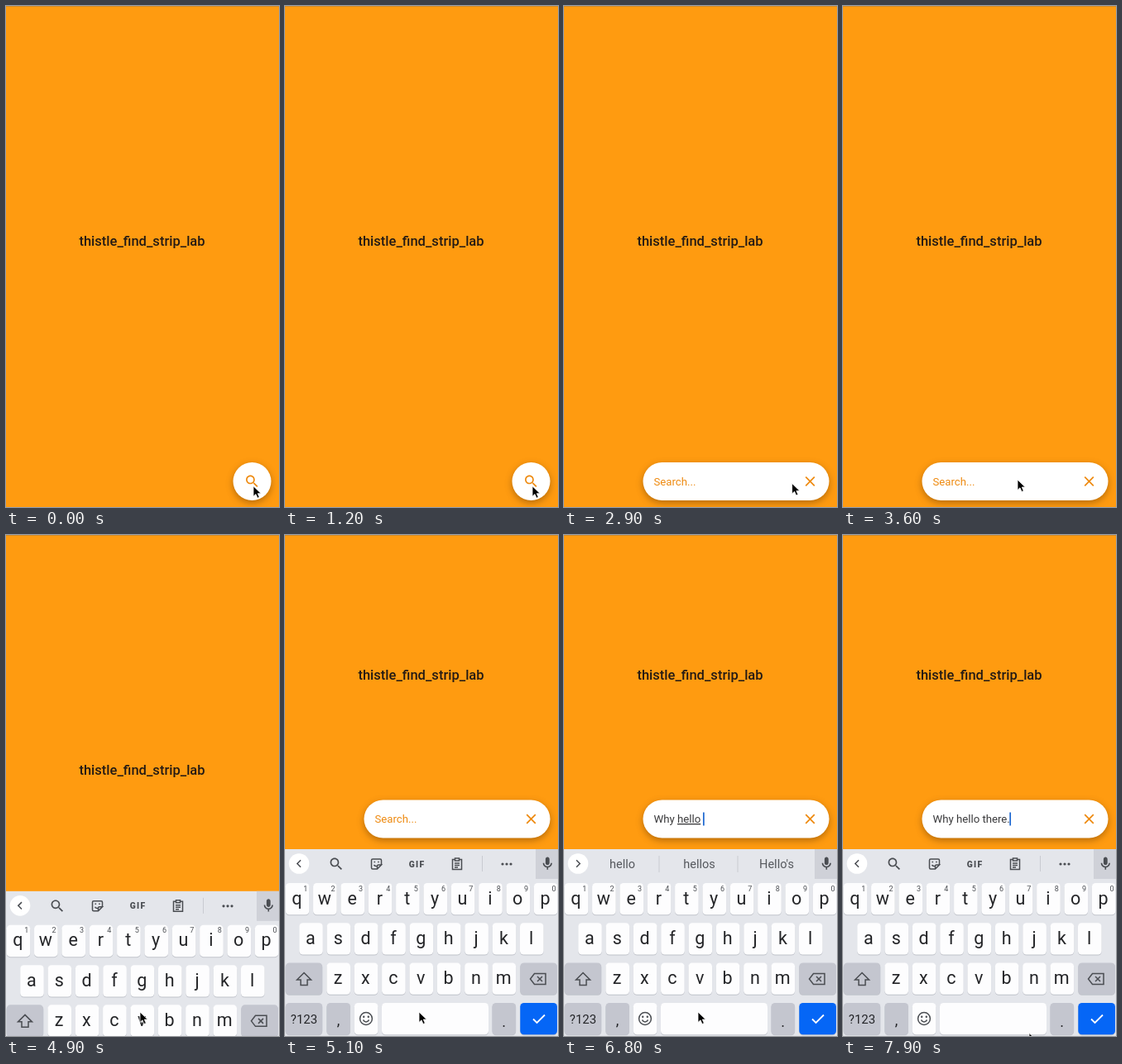
Recreate the animation shown at these times as an HTML page. Size 330 by 606 pixels, loop 8 s.

```html
<!DOCTYPE html>
<html lang="en">
<head>
<meta charset="utf-8">
<title>Search button</title>
<style>
html, body { margin: 0; width: 100%; height: 100%; overflow: hidden; background: #ff9b10; }
svg { display: block; width: 330px; height: 606px; font-family: Roboto, sans-serif; }
text { white-space: pre; }
.mid { text-anchor: middle; }
.line { fill: none; stroke: #4a4d52; stroke-width: 1.5; }
#bar { filter: drop-shadow(0 3px 4px rgba(60, 30, 0, .38)); }
</style>
</head>
<body>
<svg viewBox="0 0 330 606">
  <defs><clipPath id="pill"><rect class="pill" y="552" height="46" rx="23"/></clipPath></defs>
  <rect width="330" height="606" fill="#ff9b10"/>
  <rect width="330" height="1" fill="#cf8a2c"/>
  <text id="title" class="mid" x="164.5" y="290" font-size="16.5" font-weight="500" fill="#241a14">thistle_find_strip_lab</text>
  <g id="field">
    <rect id="bar" class="pill" y="552" height="46" rx="23" fill="#fff"/>
    <rect id="press" x="275" y="552" width="46" height="46" fill="#eeeff0" clip-path="url(#pill)"/>
    <text id="hint" x="108.5" y="579.5" font-size="13.2" fill="#ee8a10">Search...</text>
    <text id="typed" x="108.5" y="579.5" font-size="13.2" fill="#3a3a3c"><tspan></tspan><tspan text-decoration="underline"></tspan><tspan></tspan></text>
    <rect id="caret" y="567" width="1.7" height="16" fill="#1a66d0"/>
    <g id="lens"></g>
    <path id="cross" d="M292.2 569.6l10.6 10.8m0-10.8l-10.6 10.8" fill="none" stroke="#ee8a10" stroke-width="1.7"/>
  </g>
  <g id="keyboard"></g>
  <path id="mouse" d="M0 0V12.5L3 9.8L5 14.5L7.3 13.5L5.3 9H9.3Z" fill="#000" stroke="#fff" stroke-width=".8"/>
</svg>
<script>
const $ = id => document.getElementById(id);
const clamp = x => Math.min(1, Math.max(0, x));
const span = (t, a, b) => clamp((t - a) / (b - a));
const smooth = x => x * x * (3 - 2 * x);
const show = (id, opacity) => $(id).setAttribute('opacity', +opacity);
const move = (id, x, y) => $(id).setAttribute('transform', `translate(${x} ${y})`);

const LENS = 'M15.5 14h-.79l-.28-.27C15.41 12.59 16 11.11 16 9.5 16 5.91 13.09 3 9.5 3S3 5.91 3 9.5 5.91 16 9.5 16c1.61 0 3.09-.59 4.23-1.57l.27.28v.79l5 4.99L20.49 19zM9.5 14C7.01 14 5 11.99 5 9.5S7.01 5 9.5 5 14 7.01 14 9.5 11.99 14 9.5 14z';
const MIC = 'M12 14c1.66 0 3-1.34 3-3V5c0-1.66-1.34-3-3-3S9 3.34 9 5v6c0 1.66 1.34 3 3 3zm5-3c0 2.76-2.24 5-5 5s-5-2.24-5-5H5c0 3.53 2.61 6.43 6 6.92V21h2v-3.08c3.39-.49 6-3.39 6-6.92z';

const glyph = (d, x, y, fill, size = .825) =>
  `<path d="${d}" fill="${fill}" transform="translate(${x} ${y}) scale(${size}) translate(-12 -12)"/>`;
const line = (d, x, y, extra = '') => `<path class="line" d="${d}" transform="translate(${x} ${y})" ${extra}/>`;
const label = (s, x, y, size, fill = '#242528', extra = '') =>
  `<text class="mid" x="${x}" y="${y}" font-size="${size}" fill="${fill}" ${extra}>${s}</text>`;
const key = (x, y, w, fill = '#fdfdfe') =>
  `<rect x="${x}" y="${y + 1}" width="${w}" height="38.3" rx="4.5" fill="#c0c3ca"/>` +
  `<rect x="${x}" y="${y}" width="${w}" height="38.3" rx="4.5" fill="${fill}"/>`;

function keyboardMarkup() {
  const dark = '#c4c6cf', ink = '#4a4d52', step = 33.35;
  let s = '<rect y="380" width="330" height="226" fill="#e4e6eb"/>' +
    '<rect x="303" y="380" width="27" height="36" fill="#cfd1d8"/>' + glyph(MIC, 317.3, 397.5, ink, .8) +
    '<circle cx="17" cy="397.5" r="12.3" fill="#fff"/>' +
    line('M2 -4.2L-2.2 0L2 4.2', 17, 397.5, 'id="chevron"');

  s += '<g id="tools">' + glyph(LENS, 62, 398, ink) +
    line('M6 1V-4.5Q6 -6 4.5 -6H-4.5Q-6 -6 -6 -4.5V4.5Q-6 6 -4.5 6H1L6 1H2.5Q1 1 1 2.5V6M-3 -2.5h1.6M1.6 -2.5h1.6M-3 1Q-1.5 3 .5 2.5', 110.5, 398) +
    label('GIF', 159.5, 401.5, 10.3, ink, 'font-weight="900" letter-spacing="1.3"') +
    line('M-2.5 -5.5H-5.5V6.5H5.5V-5.5H2.5M-2.5 -7H2.5V-4H-2.5ZM-3 -1H3M-3 1.5H3M-3 4H1', 208, 398) +
    '<path d="M238.5 388v19" stroke="#c9cbd1"/>' +
    [263, 268, 273].map(x => `<circle cx="${x}" cy="398" r="1.6" fill="${ink}"/>`).join('') + '</g>';

  s += '<g id="words"><path d="M115 388v20M210 388v20" stroke="#c9cbd1"/>' +
    [70.5, 163.5, 257].map(x => label('', x, 403, 14.5, '#55585d')).join('') + '</g>';

  [['qwertyuiop', 15, 421], ['asdfghjkl', 31.5, 469.3], ['zxcvbnm', 64.7, 517.5]].forEach(([row, x0, y], r) => {
    [...row].forEach((c, i) => {
      const x = x0 + i * step;
      s += key(x - 14.3, y, 28.6) + label(c, x - .6, y + 25.5, 21.5);
      if (!r) s += label((i + 1) % 10, x + 9.8, y + 9.5, 9, ink);
    });
  });

  s += key(.7, 517.5, 44.5, dark) + line('M0 -7.5L8.5 1H4V7.5H-4V1H-8.5Z', 23, 537) +
    key(284.3, 517.5, 44.7, dark) + line('M-4 -6.5H9.5V6.5H-4L-9 0ZM-.5 -3L5.5 3M5.5 -3L-.5 3', 305.5, 537) +
    key(.7, 566, 44.5, dark) + label('?123', 23, 590.5, 15) +
    key(50.4, 566, 28.6, dark) + label(',', 64.5, 593, 18) +
    key(83.8, 566, 28.6) + '<circle class="line" cx="98" cy="585" r="7.4"/>' +
    line('M-3.6 1.5Q0 6.6 3.6 1.5', 98, 585) +
    `<g fill="${ink}"><circle cx="95.2" cy="582.7" r="1.2"/><circle cx="100.8" cy="582.7" r="1.2"/></g>` +
    key(117, 566, 129) + key(250.5, 566, 28.6, dark) + label('.', 264.7, 595, 18) +
    key(284.3, 566, 44.7, '#0566f6') + line('M-7 .5L-2.5 5L7 -4.5', 307, 585, 'style="stroke:#fff;stroke-width:1.8"');
  return s;
}

$('keyboard').innerHTML = keyboardMarkup();
$('lens').innerHTML = glyph(LENS, 297.5, 575, '#ee8a10');

const MESSAGE = 'Why hello there.';
const SUGGESTIONS = {
  W: ['We', 'What', 'Why'], h: ['how', 'he', 'have'], t: ['the', 'to', 'that'],
  Why: ['Why', 'Whys', "Why's"], hello: ['hello', 'hellos', "Hello's"], there: ['there', 'theres', "there's"]
};
const wordSlots = [...$('words').querySelectorAll('text')];
const parts = [...$('typed').children];

// time, x, y of the pointer tip
const TRAIL = [[0, 299, 580.7], [1400, 299, 580.7], [1600, 298.5, 579], [2700, 298.5, 579], [3300, 211, 573],
  [3800, 211, 573], [4300, 162, 577], [7400, 162, 577], [7900, 225, 602.5], [8000, 226, 603]];

function pointer(t) {
  const i = TRAIL.findIndex(p => p[0] > t), [a, x, y] = TRAIL[i - 1], [b, u, v] = TRAIL[i];
  const k = smooth(span(t, a, b));
  move('mouse', x + (u - x) * k, y + (v - y) * k);
}

function typing(t) {
  const n = Math.min(MESSAGE.length, Math.max(0, Math.floor((t - 5600) / 130) + 1));
  const [, before, word, after] = MESSAGE.slice(0, n).match(/^(.*?)(\w*)([ .]?)$/);
  const done = n === MESSAGE.length, suggesting = n > 0 && !done;
  parts[0].textContent = before + (done ? word + after : '');
  parts[1].textContent = done ? '' : word;
  parts[2].textContent = done ? '' : after;

  const full = MESSAGE.match(/\w+/g).find(w => word && w.startsWith(word));
  const list = SUGGESTIONS[word] || SUGGESTIONS[full] || [];
  wordSlots.forEach((slot, i) => slot.textContent = list[i] || '');
  show('words', suggesting);
  show('tools', !suggesting);
  $('chevron').setAttribute('transform', `translate(17 397.5) scale(${suggesting ? -1 : 1} 1)`);

  show('hint', n ? 0 : span(t, 2250, 2450));
  $('caret').setAttribute('x', 108 + (n ? $('typed').getComputedTextLength() : 0));
  show('caret', t >= 5250);
}

function draw(t) {
  const left = 274.5 - 179 * smooth(span(t, 1650, 2050));
  document.querySelectorAll('.pill').forEach(r => {
    r.setAttribute('x', left);
    r.setAttribute('width', 320.5 - left);
  });
  show('press', span(t, 1500, 1700) * (1 - span(t, 2150, 2500)));
  const swap = span(t, 2150, 2350);
  show('lens', 1 - swap);
  show('cross', swap);

  const lifted = t >= 5030;
  move('title', 0, lifted ? -115.5 : 0);
  move('field', 0, lifted ? -231.5 : 0);
  move('keyboard', 0, 230 * (1 - span(t, 4750, 5035)) ** 2);
  pointer(t);
  typing(t);
}

function loop(now) {
  draw(now % 8000);
  requestAnimationFrame(loop);
}
draw(0);
requestAnimationFrame(loop);
</script>
</body>
</html>
```
